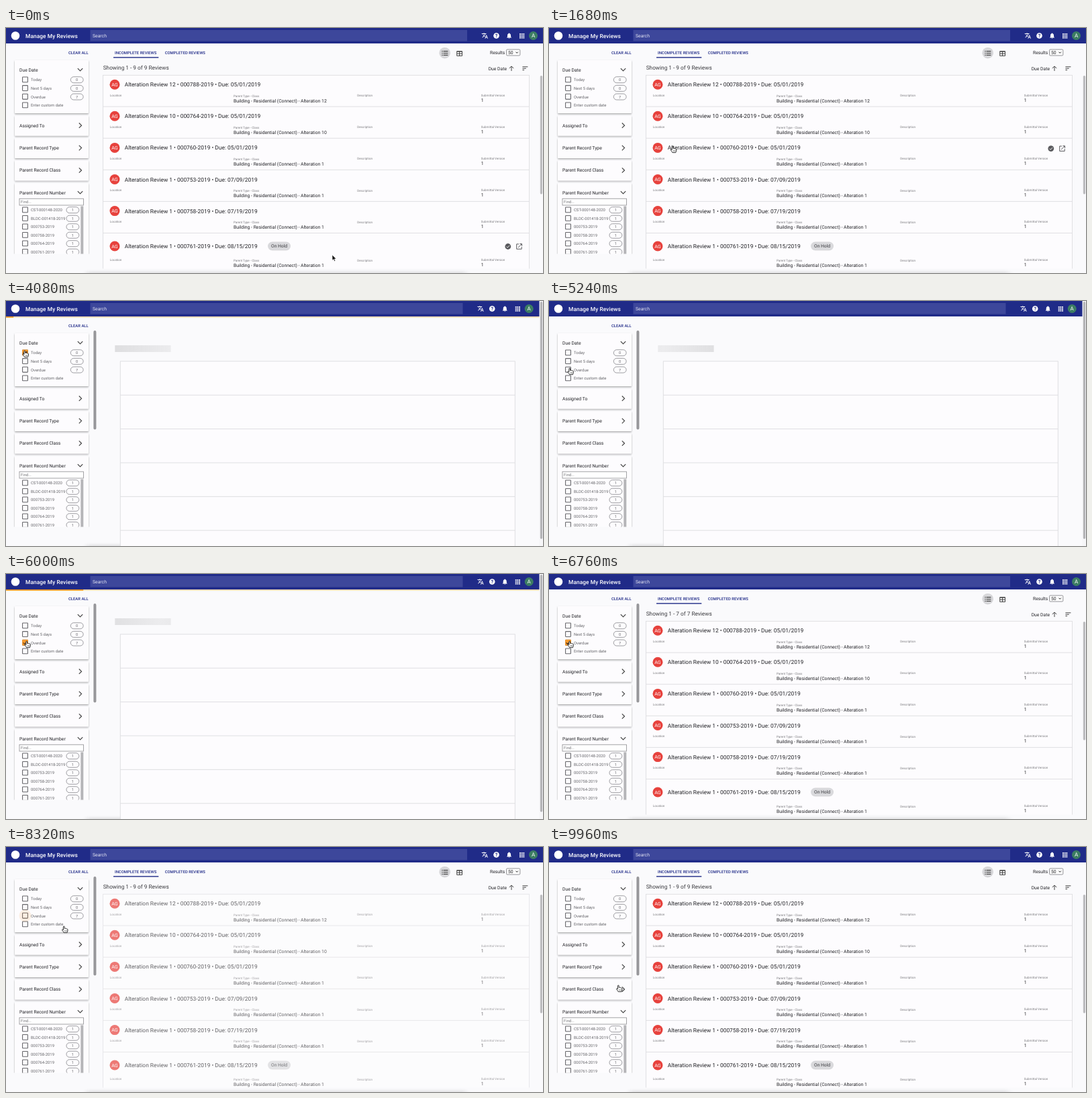
Animation, 800 px wide and 365 px high, one loop 10 s. Source, as an HTML page:

```html
<!DOCTYPE html>
<html lang="en">
<head>
<meta charset="utf-8">
<title>Manage My Reviews</title>
<style>
html,body{margin:0;width:100%;height:100%;overflow:hidden;background:#fafafc}
svg{display:block;width:800px;height:365px}
text{font-family:Roboto,sans-serif;text-rendering:geometricPrecision;white-space:pre}
</style>
</head>
<body>
<svg id="stage" viewBox="0 0 800 365" xmlns="http://www.w3.org/2000/svg"></svg>
<script>
const LOOP = 10000;
const NAVY = '#202b88', INK = '#222226', GREY = '#66666a', ORANGE = '#f79a2c';
const stage = document.getElementById('stage');

// Markup helpers
const text = (x, y, s, size, fill = INK, extra = '') =>
  `<text x="${x}" y="${y}" font-size="${size}" fill="${fill}" ${extra}>${s}</text>`;
const rect = (x, y, w, h, fill, extra = '') =>
  `<rect x="${x}" y="${y}" width="${w}" height="${h}" fill="${fill}" ${extra}/>`;
const circle = (x, y, r, fill, extra = '') =>
  `<circle cx="${x}" cy="${y}" r="${r}" fill="${fill}" ${extra}/>`;
const line = (d, color, w = 1, extra = '') =>
  `<path d="${d}" fill="none" stroke="${color}" stroke-width="${w}" ${extra}/>`;
const group = (id, body, extra = '') => `<g id="${id}" ${extra}>${body}</g>`;
const MID = 'text-anchor="middle"', BOLD = 'font-weight="500"';

const defs = `<defs>
  <filter id="shadow" x="-10%" y="-20%" width="120%" height="150%">
    <feDropShadow dx="0" dy="1.3" stdDeviation="1.2" flood-color="#000" flood-opacity=".34"/>
  </filter>
  <filter id="soft" x="-10%" y="-100%" width="120%" height="300%"><feGaussianBlur stdDeviation="4 2"/></filter>
  <clipPath id="side"><rect x="0" y="24" width="128" height="312.5"/></clipPath>
  <clipPath id="page"><rect x="135" y="24" width="665" height="334.5"/></clipPath>
  <clipPath id="track"><rect x="0" y="23" width="794.5" height="2"/></clipPath>
  <linearGradient id="shimmer" gradientUnits="userSpaceOnUse" x1="162" x2="246" spreadMethod="reflect">
    <stop offset="0" stop-color="#dedee0"/><stop offset="1" stop-color="#ececee"/>
  </linearGradient>
</defs>`;

function header() {
  let grid = '';
  for (let r = 0; r < 3; r++)
    for (let c = 0; c < 3; c++) grid += rect(765 + c * 2.7, 8.2 + r * 2.7, 1.9, 1.9, '#fff');
  const translate = 'M12.87 15.07l-2.54-2.51.03-.03c1.74-1.94 2.98-4.17 3.71-6.53H17V4h-7V2H8v2H1v1.99h11.17C11.5 7.92 10.44 9.75 9 11.35 8.07 10.32 7.3 9.19 6.69 8h-2c.73 1.63 1.73 3.17 2.98 4.56l-5.09 5.02L4 19l5-5 3.11 3.11.76-2.04zM18.5 10h-2L12 22h2l1.12-3h4.75L21 22h2l-4.5-12zm-2.62 7l1.62-4.33L19.12 17h-3.24z';
  const bell = 'M12 22c1.1 0 2-.9 2-2h-4c0 1.1.89 2 2 2zm6-6v-5c0-3.07-1.64-5.64-4.5-6.32V4c0-.83-.67-1.5-1.5-1.5s-1.5.67-1.5 1.5v.68C7.63 5.36 6 7.92 6 11v5l-2 2v1h16v-1l-2-2z';
  const icon = (x, d) => `<path transform="translate(${x - 5} 6.4) scale(.42)" d="${d}" fill="#fff"/>`;
  return rect(0, 0, 800, 23, NAVY) +
    circle(14, 11.5, 6.3, '#fff') +
    text(29, 14.5, 'Manage My Reviews', 8.4, '#fff', BOLD + ' letter-spacing=".06"') +
    '<rect id="search" x="125.5" y="3" height="16.5" fill="#3d479b"/>' +
    text(129, 14, 'Search', 6.8, '#e6e7f4') +
    group('tools', icon(713.3, translate) + circle(730.5, 11.5, 4.3, '#fff') +
      text(730.5, 14.1, '?', 7.2, NAVY, MID + ' font-weight="700"') + icon(749.5, bell) + grid +
      circle(785.5, 11.5, 6.5, '#3c7d63') + text(785.5, 14.4, 'A', 8, '#fff', MID));
}

function sidebar() {
  const card = (y, h) => rect(13, y, 110, h, '#fdfcfe', 'rx="1" filter="url(#shadow)"');
  const down = y => line(`M106.8 ${y - 1.8}l3.7 3.7 3.7-3.7`, '#444', 1.2);
  const right = y => line(`M108.8 ${y - 3.7}l3.7 3.7-3.7 3.7`, '#444', 1.2);
  const box = y => rect(24.6, y - 4, 7.8, 7.8, 'none', `stroke="${GREY}" stroke-width="1.1" rx=".6"`);
  const pill = (x, y, n) =>
    rect(x, y - 4.3, 18.8, 9, '#fdfcfe', 'rx="4.5" stroke="#85858a" stroke-width=".8"') +
    text(x + 9.4, y + 2.4, n, 5.6, GREY, MID);
  const item = (y, label, x, n) =>
    box(y) + text(37, y + 2.2, label, 5.95, GREY) + (n === undefined ? '' : pill(x, y, n));
  const tick = (id, y) => group(id, rect(24.1, y - 4.5, 8.8, 8.8, ORANGE, 'rx=".8"') +
    line(`M25.7 ${y}l2 2 3.8-4`, '#2b2320', 1.2));
  const records = ['CST-000148-2020', 'BLDC-001418-2019', '000753-2019', '000758-2019', '000764-2019', '000761-2019'];
  let s = card(48, 79) + text(20, 64.6, 'Due Date', 6.8) + down(62);
  s += ['Today', 'Next 5 days', 'Overdue', 'Enter custom date']
    .map((l, i) => item(77 + i * 12.65, l, 96.3, [0, 0, 7][i])).join('');
  ['Assigned To', 'Parent Record Type', 'Parent Record Class'].forEach((l, i) => {
    const y = 145.2 + i * 33.4;
    s += card(y - 14.7, 30) + text(20, y + 2.4, l, 6.8) + right(y);
  });
  s += card(231, 130) + text(20, 247.6, 'Parent Record Number', 6.8) + down(245) +
    rect(20, 254.2, 95.5, 9.8, '#fff', 'stroke="#8c8c90" stroke-width=".8"') + text(22, 261.4, 'Find...', 5.9, '#77777b') +
    rect(111.3, 265.5, 4, 80, '#b5b5b8');
  s += records.map((l, i) => item(271 + i * 12.5, l, 90, 1)).join('');
  return text(93, 38.6, 'CLEAR ALL', 5.9, NAVY, BOLD) +
    `<g clip-path="url(#side)">${s}</g>` + tick('today', 77) + tick('overdue', 102.3) +
    circle(28.5, 0, 0, ORANGE, 'id="ripple"') +
    rect(130.4, 44, 4, 147.5, '#97979a', 'rx="2" id="sideBar"');
}

const rows = [
  ['12', '000788', '05/01'], ['10', '000764', '05/01'], ['1', '000760', '05/01'],
  ['1', '000753', '07/09'], ['1', '000758', '07/19'], ['1', '000761', '08/15']
];
const rowTop = i => 70 + i * 47.1;

function row([num, rec, due], i) {
  const top = rowTop(i), held = i === 5, mid = top + (held ? 19.5 : 14.2), y = top + (held ? 10 : 0);
  const small = (x, dy, s) => text(x, y + dy, s, 4.5, '#77777b');
  return (i ? line(`M144.5 ${top}H779.5`, '#dddde0', .9) : '') +
    circle(162, mid, 7.5, '#e7423d') + text(162, mid + 2.6, 'AG', 7.1, '#fff', MID) +
    text(176.7, mid + 3, `Alteration Review ${num} • ${rec}-2019 • Due: ${due}/2019`, 8.4) +
    (held ? rect(390, mid - 6.5, 34, 13, '#d9d9dc', 'rx="6.5"') + text(407, mid + 2.4, 'On Hold', 6.7, '#3a3a3e', MID) : '') +
    small(154.8, 31.6, 'Location') + small(339, 32.6, 'Parent Type - Class') +
    small(523.2, 32.2, 'Description') + small(707.8, 31.6, 'Submittal Version') +
    text(339, y + 40.9, `Building - Residential (Connect) - Alteration ${num}`, 6.82) +
    text(707.8, y + 39.6, '1', 6.82);
}

function list() {
  let bullets = '';
  for (const y of [34.6, 37.5, 40.4])
    bullets += line(`M649.3 ${y}h1.3M651.6 ${y}h6.8`, '#444', 1.1);
  const actions = circle(747.8, 0, 4.4, '#59595d') + line('M745.6 .1l1.6 1.6 3-3.2', '#fff', .9) +
    line('M764 -3.6H760.7V3.8H768.2V.5M765.3 -3.9H768.5V-.7M768.3 -3.7L763 1.6', '#59595d', 1);
  return text(162, 38.5, 'INCOMPLETE REVIEWS', 5.9, NAVY, BOLD) +
    text(236.7, 38.5, 'COMPLETED REVIEWS', 5.9, NAVY, BOLD) +
    rect(160, 43.2, 67.3, 1.4, NAVY) +
    circle(653.7, 37.2, 8.3, '#d6d6d9') + bullets +
    line('M671.7 34.7H679.5V41.5H671.7ZM671.7 35.2H679.5M671.7 38.3H679.5M675.6 35V41.5', '#444', 1) +
    text(721, 39, 'Results', 6.75) +
    rect(745.5, 32, 20.3, 9, '#fff', 'rx="1.3" stroke="#77777b" stroke-width=".8"') +
    text(748, 38.9, '50', 6.8) + line('M759.5 35.6l1.7 1.8 1.7-1.8', '#222', 1) +
    text(144.7, 62.2, '', 8.27, '#3a3a3e', 'id="count"') +
    text(718.7, 62.6, 'Due Date', 6.75) +
    line('M753 64V57M749.8 60.1L753 56.9L756.2 60.1', '#444', 1) +
    line('M769.4 57.8h8M769.4 60.2h5.4M769.4 62.6h2.7', '#444', 1) +
    group('cards', rect(144.5, 70.3, 635, 300, '#fdfcfe', 'stroke="#dddde0" stroke-width=".9"') + rows.map(row).join('')) +
    group('actions', actions) +
    rect(795.8, 71, 3.3, 176.5, '#bcbcbf', 'rx="1.6"');
}

function skeleton() {
  let s = rect(162.3, 66, 83.3, 10, 'url(#shimmer)') +
    rect(170.3, 89.8, 588, 290, '#fdfcfe', 'stroke="#dcdcdf" stroke-width=".9"');
  for (let i = 1; i < 6; i++) s += line(`M170.3 ${89.8 + i * 50.4}H758.3`, '#dcdcdf', .9);
  return s + rect(794.5, 0, 5.5, 365, '#f6f6f8') + rect(795.8, 1, 3.4, 353.5, '#b4b4b7', 'rx="1.7"');
}

const progress = group('progress', rect(0, 23, 794.5, 1.8, '#f6dcb4') +
  rect(0, 23, 300, 1.8, '#f59a23', 'id="runner"'), 'clip-path="url(#track)"');

const pointer = group('arrow',
  '<path d="M0 0V8.2L1.9 6.5L3.2 9.4L4.6 8.8L3.3 6H5.9Z" fill="#111" stroke="#fff" stroke-width=".6"/>') +
  group('hand', '<path d="M-.9 .9C-.9-.3 .9-.3 .9 .9V3.5C1.5 2.9 2.4 3.1 2.6 3.7C3.2 3.3 4 3.5 4.2 4.1C4.9 3.8 5.6 4.2 5.6 5V7C5.6 8 4.9 8.6 4.8 9.6H-.1C-.5 8.3-1.7 7.4-2.6 5.9C-3.1 4.9-2 4.3-1.4 5L-.9 5.6Z" fill="#fff" stroke="#111" stroke-width=".85"/>' +
    line('M1.3 6.3v1.8M2.7 6.3v1.8M4 6.3v1.8', '#111', .5));

stage.innerHTML = defs + rect(0, 0, 800, 365, '#fafafc') +
  rect(120, 363, 565, 8, '#000', 'opacity=".1" filter="url(#soft)"') +
  header() + sidebar() + group('list', list(), 'clip-path="url(#page)"') +
  group('skeleton', skeleton()) + progress + group('cursor', pointer);

const el = {};
stage.querySelectorAll('[id]').forEach(n => el[n.id] = n);
const show = (n, on) => n.style.display = on ? '' : 'none';
const set = (n, k, v) => n.setAttribute(k, v);
const within = (t, spans) => spans.some(([a, b]) => t >= a && t < b);

// Pointer stops: time, x, y
const path = [
  [0, 486, 338], [40, 486, 338], [1040, 186, 213], [1160, 184, 176], [1680, 184, 176],
  [2680, 36, 82], [3040, 27.8, 74], [4480, 27.8, 74], [5200, 30.7, 100], [8040, 30.7, 100],
  [8320, 86.3, 118], [8600, 90, 126], [8840, 90, 126], [9120, 92, 138], [9280, 92, 138],
  [9920, 103.3, 206], [LOOP, 103.3, 206]
];
const clicks = [[3360, 77], [4440, 77], [5960, 102.3], [7960, 102.3]];
const loading = [[3400, 5360], [6000, 6480], [8000, 8240]];
const bars = [[3400, 4240], [6000, 6480]];

function place(t) {
  const i = path.findIndex(p => p[0] > t), [t0, x0, y0] = path[i - 1], [t1, x1, y1] = path[i];
  const u = (t - t0) / (t1 - t0), k = u * u * (3 - 2 * u);
  return [x0 + (x1 - x0) * k, y0 + (y1 - y0) * k];
}

function draw(t) {
  const [x, y] = place(t), busy = within(t, loading);
  show(el.list, !busy);
  show(el.skeleton, busy);
  set(el.search, 'width', busy ? 555 : 561.5);
  set(el.tools, 'transform', `translate(${busy ? -6.3 : 0} 0)`);
  set(el.shimmer, 'gradientTransform', `translate(${(t - 4080) * .08} 0)`);
  const n = t >= 6480 && t < 8000 ? 7 : 9;
  el.count.textContent = `Showing 1 - ${n} of ${n} Reviews`;

  const since = Math.min(...loading.map(s => t >= s[1] ? t - s[1] : LOOP));
  set(el.cards, 'opacity', Math.min(1, .5 + since / 400));

  const bar = within(t, bars);
  show(el.progress, bar);
  if (bar) set(el.runner, 'x', ((t - 3400) * 1.2 + 294) % 1100 - 300);

  show(el.today, t >= 3360 && t < 4440);
  show(el.overdue, t >= 5960 && t < 7960);
  const hit = clicks.find(c => t >= c[0] && t < c[0] + 720);
  show(el.ripple, hit);
  if (hit) {
    const u = (t - hit[0]) / 720;
    set(el.ripple, 'cy', hit[1]);
    set(el.ripple, 'r', 9 * Math.min(1, .3 + u * 2));
    set(el.ripple, 'opacity', .26 * (1 - u));
  }

  const over = x > 144.5 && y > 70 ? Math.min(5, Math.floor((y - 70) / 47.1)) : -1;
  show(el.actions, over >= 0);
  if (over >= 0) set(el.actions, 'transform', `translate(0 ${rowTop(over) + (over === 5 ? 20 : 15.4)})`);
  show(el.sideBar, x < 135);

  const arrow = x > 380 || (x > 123 && x < 150);
  show(el.arrow, arrow);
  show(el.hand, !arrow);
  set(el.cursor, 'transform', `translate(${x} ${y})`);
}

function tick() {
  draw(performance.now() % LOOP);
  requestAnimationFrame(tick);
}
tick();
</script>
</body>
</html>
```
